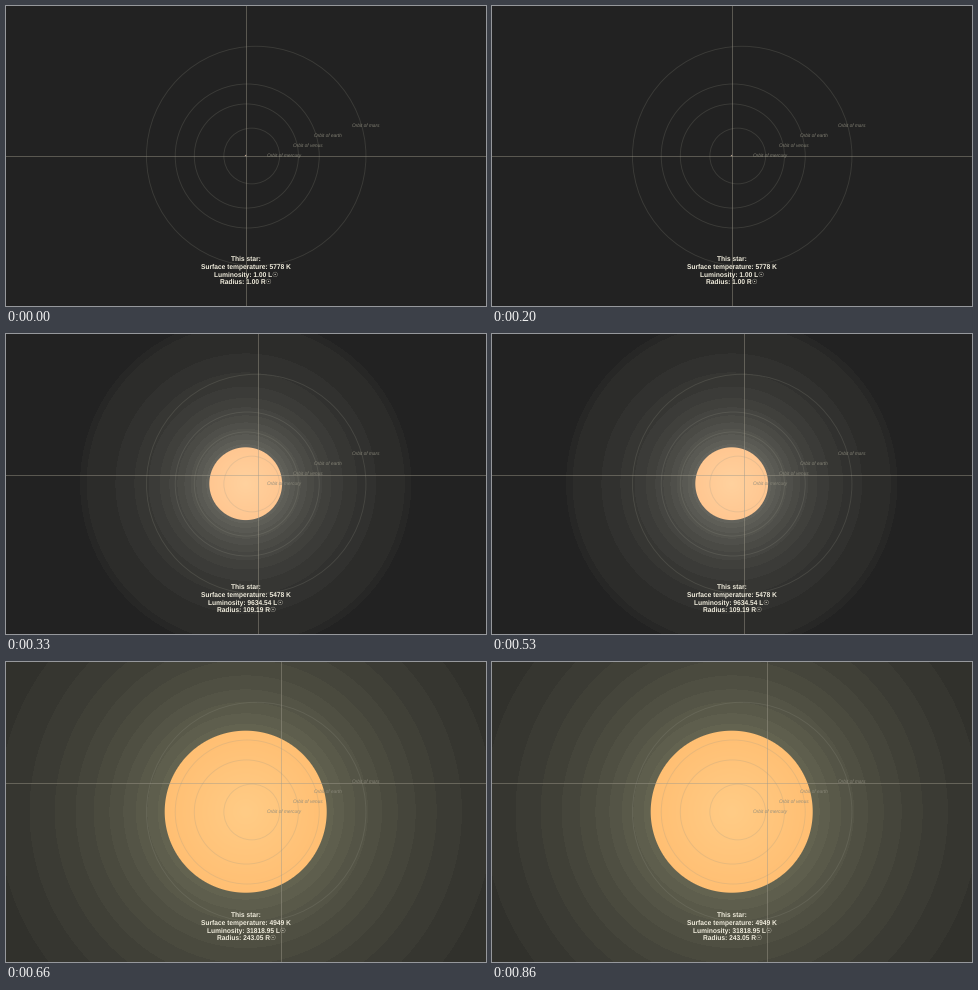
Recreate the animation shown at these times as a matplotlib script. Size 480 px wide and 300 px high, loop 990 ms.

```python
import numpy as np
import matplotlib.pyplot as plt
from matplotlib.animation import FuncAnimation
from matplotlib.patches import Circle

W, H, DPI = 480, 300, 100
PX = 72 / DPI
CX, CY = W / 2, H / 2
AU = 72  # pixels
T_SUN = 5778
FONTS = ["Liberation Sans", "DejaVu Sans"]

# temperature in K, luminosity in suns
STARS = [(T_SUN, 1), (5478.3, 9634.54), (4949.95, 31818.95)]

# semi-major axis in AU, eccentricity
PLANETS = {
    "mercury": (0.387, 0.206),
    "venus": (0.723, 0.007),
    "earth": (1.0, 0.017),
    "mars": (1.524, 0.093),
}

plt.rcParams["text.hinting"] = "none"

fig = plt.figure(figsize=(W / DPI, H / DPI), dpi=DPI, facecolor="#222222")
ax = fig.add_axes([0, 0, 1, 1])
ax.set_axis_off()

yy, xx = np.mgrid[0:H, 0:W] + 0.5
dist = np.hypot(xx - CX + 0.3, yy - CY + 0.3)[..., None]


def star_radius(temp, lum):
    """Radius in suns, from the Stefan-Boltzmann law."""
    return lum ** 0.5 * (T_SUN / temp) ** 2


def star_image(temp, lum):
    """Banded halo with a shaded disc; cooler stars look warmer."""
    r = star_radius(temp, lum) / 3
    warm = (T_SUN - temp) / 829
    t = dist / r

    halo = 66 * np.exp(-(np.maximum(t, 1) - 1) / 1.55)
    halo = np.where(t < 4.55, np.round(halo / 5) * 5, 0)
    sky = 34 + halo * np.array([1, 1, 1 - 0.28 * warm])

    core = np.array([255, 213 - 9 * warm, 172 - 38 * warm])
    rim = np.array([255, 203 - 12 * warm, 162 - 47 * warm])
    disc = core + (rim - core) * np.clip(t, 0, 1)
    cover = np.clip(r - dist + 0.5, 0, 1)
    return (sky + (disc - sky) * cover).astype(np.uint8)


def write(x, y, size, color, text="", **kw):
    return ax.text(x, y, text, fontsize=size * PX, color=color, family=FONTS,
                   ha="center", va="baseline", **kw)


images = [star_image(*s) for s in STARS]
star = ax.imshow(images[0], extent=(0, W, H, 0), interpolation="nearest")

for i, (name, (axis, ecc)) in enumerate(PLANETS.items()):
    r = axis * AU
    ax.add_patch(Circle((CX + ecc * r, CY), r, fill=False, lw=0.9 * PX,
                        ec="#969688", alpha=0.22))
    write(CX + r + 10, CY + 1.3 - 10 * i, 4.7, "#8c8a7c", f"Orbit of {name}",
          style="italic", alpha=0.9)

hair = dict(color="#a09b8c", alpha=0.45, lw=PX, snap=False)
vline = ax.axvline(CX, **hair)
hline = ax.axhline(CY, **hair)
lines = [write(CX, 255.2 + 7.5 * i, 6.64, "#f0ecdc", weight="bold")
         for i in range(4)]

ax.set_xlim(0, W)
ax.set_ylim(H, 0)
ax.set_aspect("auto")


def draw(i):
    temp, lum = STARS[i]
    star.set_data(images[i])

    # the crosshair picks temperature across and luminosity upwards
    x = int(CX + 0.5 + (T_SUN - temp) / 24) + 0.5
    y = int(CY + 0.5 - lum / 1085) + 0.5
    vline.set_xdata([x, x])
    hline.set_ydata([y, y])

    info = ("This star:",
            f"Surface temperature: {int(temp)} K",
            f"Luminosity: {lum:.2f} L\u2609",
            f"Radius: {star_radius(temp, lum):.2f} R\u2609")
    for line, text in zip(lines, info):
        line.set_text(text)
    return [star, vline, hline, *lines]


anim = FuncAnimation(fig, draw, frames=len(STARS), interval=330,
                     repeat=True, repeat_delay=0, blit=False)
plt.show()
```
